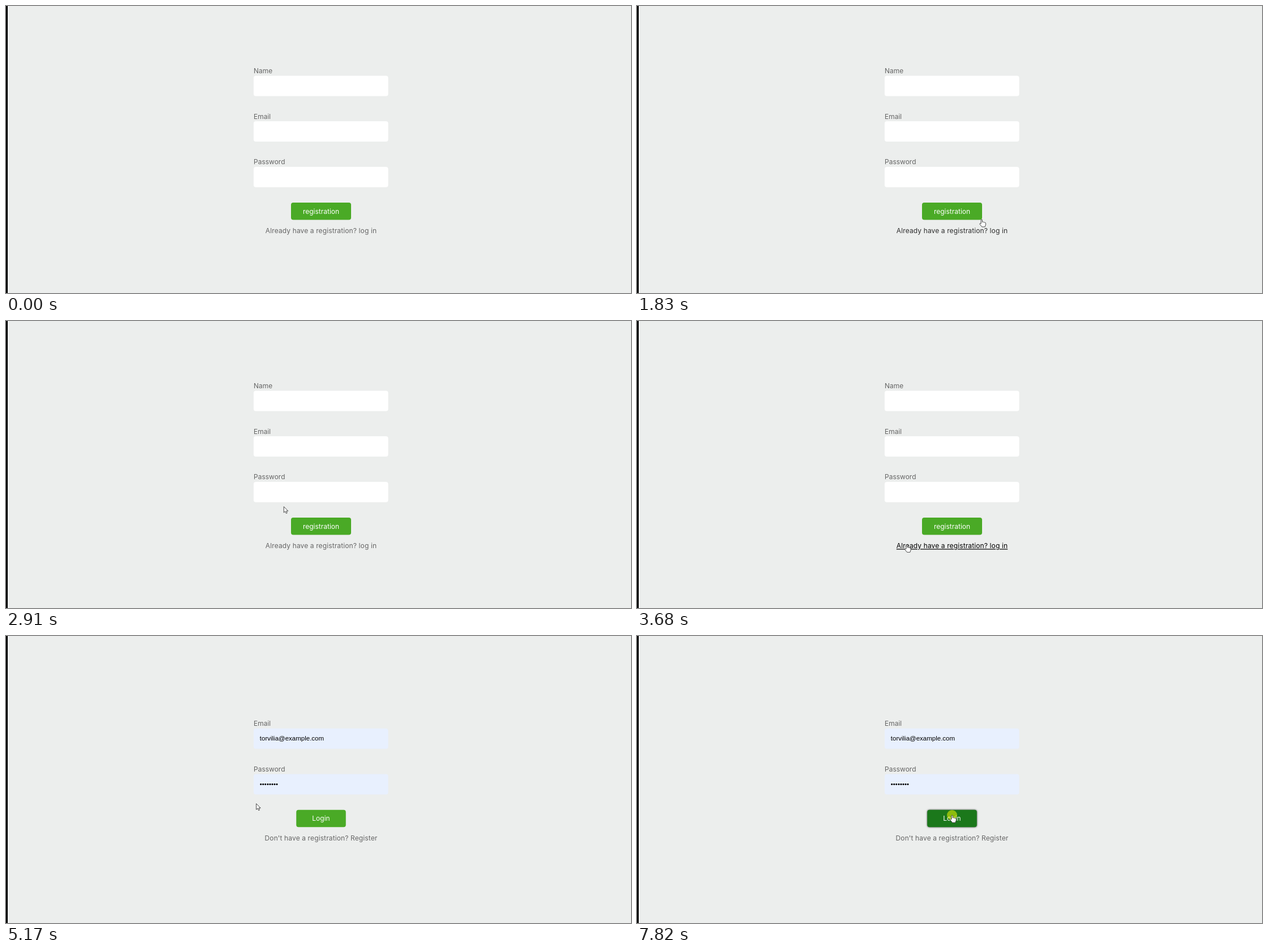
Recreate the animation shown at these times as an HTML page. Size 1103 by 508 pixels, loop 8000 ms.

```html
<!DOCTYPE html>
<html lang="en">
<head>
<meta charset="utf-8">
<title>Registration and login</title>
<style>
  html, body { margin: 0; width: 100%; height: 100%; overflow: hidden; background: #eceeed; }
  svg { display: block; width: 1103px; height: 508px; }
  text { font: 12px Inter, sans-serif; fill: #666; }
  .caption, .link { text-anchor: middle; }
  .caption { fill: #fff; }
  .link { letter-spacing: .12px; }
  .field { fill: #fff; }
  .entry { font: 11.5px "Liberation Sans", Arial, sans-serif; fill: #000; visibility: hidden; }
  .filled .field { fill: #e8f0fe; }
  .filled .entry { visibility: inherit; }
  #pointer path { stroke: #333; stroke-width: .9; stroke-linejoin: round; fill: #fff; }
  #pointer .ibeam { fill: none; }
</style>
</head>
<body>
<svg viewBox="0 0 1103 508">
  <rect width="1103" height="508" fill="#eceeed"/>
  <rect width="3" height="508"/>
  <g id="views"></g>
  <g id="pointer">
    <circle id="click" r="9" fill="#ff0" fill-opacity=".5"/>
    <path class="arrow" d="M.5 .5V11L3 8.8L4.6 12.5L6.4 11.7L4.9 8.2H8Z"/>
    <path class="hand" d="M-1 7.5V1.4Q-1 .3 .1 .3T1.2 1.4V4.8Q2.3 4 3.2 5.1Q4.4 4.4 5.2 5.6Q7.2 5.2 7.2 7V9.5L5.8 13.3H.6L-3.2 8.6Q-3.6 7 -2.2 7Z"/>
    <path class="ibeam" d="M-3 -7.5H3M0 -7.5V7.5M-3 7.5H3"/>
  </g>
</svg>

<script>
const LOOP = 8000, START = 600, STEP = 67.4, SWAP = 4280, FILL = 4570;
const FADE = 150, CLICK = 180, clicks = [4100, 7820];
const LEFT = 437, WIDTH = 237.5, MID = 556, ROW = 80.6, FIELD = 36, BUTTON = 30.5;
const $ = s => document.querySelector(s);

// A form is centred on the stage; its height follows from its number of fields.
function makeForm(id, labels, entries, caption, btnWidth, linkText) {
  const top = 244.4 - ROW / 2 * labels.length;
  const rows = labels.map((label, i) => ({ label, entry: entries[i] || "", y: top + i * ROW }));
  const btn = { x: MID - btnWidth / 2, y: top + ROW * labels.length - 17.3, w: btnWidth, h: BUTTON };
  const link = { x: 457, y: btn.y + 41.5, w: 198, h: 17 };
  const box = (name, { x, y, w, h }) =>
    `<rect class="${name}" x="${x}" y="${y}" width="${w}" height="${h}" rx="4"/>`;
  const fields = rows.map(r => ({ x: LEFT, y: r.y, w: WIDTH, h: FIELD }));
  $("#views").innerHTML += `<g id="${id}">` + rows.map((r, i) =>
    `<text x="${LEFT}" y="${r.y - 4.5}">${r.label}</text>` + box("field", fields[i]) +
    `<text class="entry" x="447.8" y="${r.y + 21.6}">${r.entry}</text>`).join("") +
    box("btn", btn) +
    `<text class="caption" x="${MID}" y="${btn.y + 19.7}">${caption}</text>` +
    `<text class="link" x="${MID}" y="${btn.y + 54.3}">${linkText}</text></g>`;
  return { id, btn, link, fields };
}

const register = makeForm("register", ["Name", "Email", "Password"], [],
  "registration", 106, "Already have a registration? log in");
const login = makeForm("login", ["Email", "Password"], ["torvilia@example.com", "•".repeat(8)],
  "Login", 87.5, "Don't have a registration? Register");

// Turning points of the pointer: time, x, y
const path = [
  [600, 1014, 446], [1000, 720, 362], [1135, 624, 392], [1690, 634, 397],
  [1900, 590, 364], [2210, 578, 356], [2285, 583, 335], [2700, 546, 307],
  [3000, 458, 340], [3330, 476, 396], [3880, 476, 396], [4080, 637, 398],
  [4560, 637, 398], [4960, 600, 394], [5110, 440, 298], [5400, 500, 210],
  [5750, 606, 190], [6150, 645, 290], [6350, 625, 342], [6500, 545, 345],
  [6650, 555, 356], [6750, 555, 356], [7100, 556, 317], [LOOP, 556, 317]
];

const clamp = v => Math.min(1, Math.max(0, v));
const mix = (a, b, p) => `rgb(${a.map((v, i) => Math.round(v + (b[i] - v) * p))})`;
const inside = ([x, y], r) => x > r.x && x < r.x + r.w && y > r.y && y < r.y + r.h;

function position(t) {
  const i = Math.max(1, path.findIndex(k => k[0] > t));
  const [t0, x0, y0] = path[i - 1], [t1, x1, y1] = path[i];
  const p = clamp((t - t0) / (t1 - t0));
  return [x0 + (x1 - x0) * p, y0 + (y1 - y0) * p];
}

// Replays the ticks since the form appeared, so hover fades depend on time alone.
function replay(form, from, t) {
  const level = { btn: 0, link: 0 };
  let at = position(from);
  for (let tick = START; tick <= t; tick += STEP) {
    if (tick < from) continue;
    for (const part in level)
      level[part] = clamp(level[part] + (inside(at, form[part]) ? 1 : -1) * STEP / FADE);
    at = position(tick);
  }
  return { level, at };
}

function draw(t) {
  const form = t < SWAP ? register : login;
  const { level, at } = replay(form, t < SWAP ? START : SWAP, t);
  const onLink = inside(at, form.link), onBtn = inside(at, form.btn);

  for (const f of [register, login])
    $("#" + f.id).style.visibility = f === form ? "visible" : "hidden";
  $("#login").classList.toggle("filled", t >= FILL);

  const link = $(`#${form.id} .link`).style, btn = $(`#${form.id} .btn`).style;
  link.fill = mix([102, 102, 102], [0, 0, 0], level.link);
  link.textDecoration = onLink ? "underline" : "none";
  btn.fill = mix([74, 170, 38], [27, 120, 27], level.btn);
  btn.filter = level.btn ? `drop-shadow(0 0 1.5px rgba(0,0,0,${0.75 * level.btn}))` : "none";

  const kind = onLink || onBtn ? "hand" : form.fields.some(f => inside(at, f)) ? "ibeam" : "arrow";
  $("#pointer").setAttribute("transform", `translate(${at})`);
  $("#pointer").style.display = t < START ? "none" : "";
  for (const k of ["arrow", "hand", "ibeam"])
    $("." + k).style.display = k === kind ? "" : "none";
  $("#click").style.display = clicks.some(c => t >= c && t < c + CLICK) ? "" : "none";
}

const origin = performance.now();
function frame() {
  draw((performance.now() - origin) % LOOP);
  requestAnimationFrame(frame);
}
frame();
</script>
</body>
</html>
```
